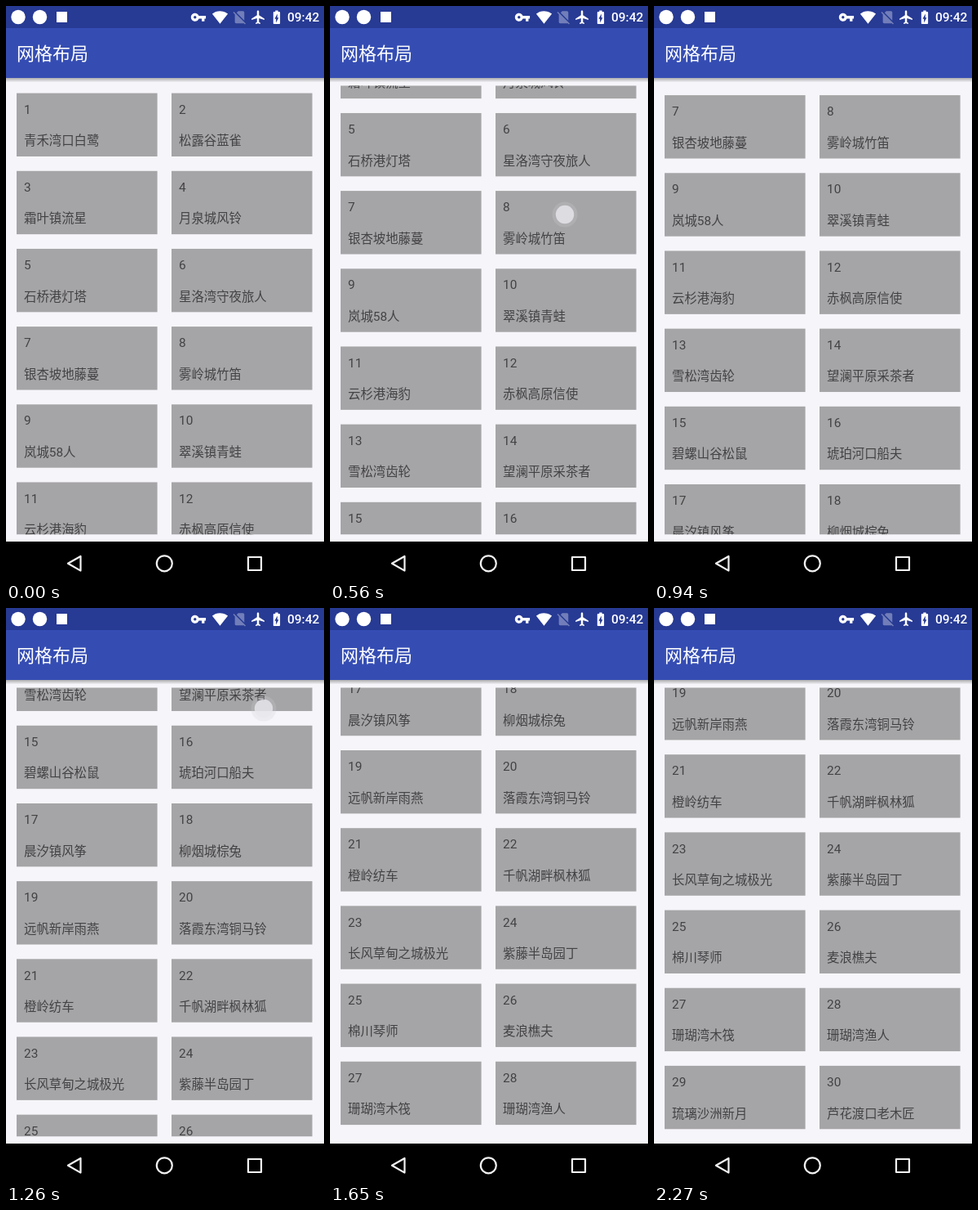
An HTML page for the animation above (2.65 s loop, 390 by 702 pixels).

```html
<!DOCTYPE html>
<html lang="zh-CN">
<head>
<meta charset="utf-8">
<style>
html, body { margin: 0; width: 100%; height: 100%; overflow: hidden; background: #f6f5f9; }
svg { display: block; width: 390px; height: 702px; font-family: Roboto, "Noto Sans CJK SC", "Noto Sans CJK", sans-serif; }
#list { font-size: 15.4px; fill: #434244; }
#list rect { fill: #a5a4a6; }
</style>
</head>
<body>
<svg viewBox="0 0 390 702">
  <defs>
    <clipPath id="view"><rect y="97.5" width="390" height="548.7"/></clipPath>
    <linearGradient id="shadow" x2="0" y2="1">
      <stop stop-color="#000" stop-opacity=".3"/>
      <stop offset="1" stop-color="#000" stop-opacity="0"/>
    </linearGradient>
  </defs>
  <rect width="390" height="702" fill="#f6f5f9"/>
  <g clip-path="url(#view)"><g id="list"></g></g>

  <rect y="88" width="390" height="5.5" fill="url(#shadow)"/>
  <rect width="390" height="88" fill="#354db3"/>
  <rect width="390" height="27" fill="#273a94"/>
  <g id="status" fill="#fff">
    <circle cx="15" cy="13.5" r="8.7"/>
    <circle cx="41.5" cy="13.5" r="8.7"/>
    <rect x="62" y="7" width="13" height="13"/>
    <text x="345" y="19.3" font-size="15.5" font-weight="500">09:42</text>
    <text x="13" y="66" font-size="22">网格布局</text>
  </g>

  <rect y="655" width="390" height="47" fill="#000"/>
  <g fill="none" stroke="#f2f2f2" stroke-width="2.2" stroke-linejoin="round">
    <path d="M76 681.8 L91.5 673 V690.6 Z"/>
    <circle cx="194.3" cy="681.8" r="9.5"/>
    <rect x="297" y="674" width="16" height="16"/>
  </g>

  <g id="touch">
    <circle r="15.5" fill="#d0ced8" opacity=".25"/>
    <circle r="11.2" fill="#e8e7ec" opacity=".8"/>
  </g>
</svg>
<script>
const $ = id => document.getElementById(id);

const names = `青禾湾口白鹭 松露谷蓝雀 霜叶镇流星 月泉城风铃 石桥港灯塔 星洛湾守夜旅人
银杏坡地藤蔓 雾岭城竹笛 岚城58人 翠溪镇青蛙 云杉港海豹 赤枫高原信使
雪松湾齿轮 望澜平原采茶者 碧螺山谷松鼠 琥珀河口船夫 晨汐镇风筝 柳烟城棕兔
远帆新岸雨燕 落霞东湾铜马铃 橙岭纺车 千帆湖畔枫林狐 长风草甸之城极光 紫藤半岛园丁
棉川琴师 麦浪樵夫 珊瑚湾木筏 珊瑚湾渔人 琉璃沙洲新月 芦花渡口老木匠`.split(/\s+/);

$('list').innerHTML = names.map((name, i) => {
  const x = i % 2 ? 203 : 13, y = 106.6 + (i >> 1) * 95.17;
  return `<rect x="${x}" y="${y}" width="172.6" height="77.4"/>
    <text x="${x + 9}" y="${y + 25.2}">${i + 1}</text>
    <text x="${x + 9}" y="${y + 63.7}">${name}</text>`;
}).join('');

// Status icons on a 24-unit grid: centre x, opacity, path
const icons = [
  [236, 1, 'M12.65 10C11.83 7.67 9.61 6 7 6c-3.31 0-6 2.69-6 6s2.69 6 6 6c2.61 0 4.83-1.67 5.65-4H17v4h4v-4h2v-4zM7 14c-1.1 0-2-.9-2-2s.9-2 2-2 2 .9 2 2-.9 2-2 2z'],
  [262.5, 1, 'M12 21.5L23.64 7C23.2 6.66 18.7 3 12 3S.8 6.66.36 7z'],
  [286.5, .35, 'M19 5c0-1.1-.9-2-2-2h-7L7.66 5.34 19 16.68zM3.65 3.88L2.38 5.15 5 7.77V19c0 1.1.9 2 2 2h10c.35 0 .67-.1.96-.26l1.88 1.88 1.27-1.27z'],
  [309.5, 1, 'M21 16v-2l-8-5V3.5C13 2.67 12.33 2 11.5 2S10 2.67 10 3.5V9l-8 5v2l8-2.5V19l-2 1.5V22l3.5-1 3.5 1v-1.5L13 19v-5.5z'],
  [332, 1, 'M15.67 4H14V2h-4v2H8.33C7.6 4 7 4.6 7 5.33v15.33C7 21.4 7.6 22 8.33 22h7.33c.74 0 1.34-.6 1.34-1.33V5.33C17 4.6 16.4 4 15.67 4zM11 20v-5.5H9L13 7v5.5h2z']
];
$('status').innerHTML += icons.map(([x, alpha, d]) =>
  `<path d="${d}" opacity="${alpha}" transform="translate(${x - 10} 3.8) scale(.83)"/>`).join('');

const LOOP = 2650, MAX_SCROLL = 879.1;

const ticks = [0, 250, 330, 400, 480, 550, 640, 710, 790, 870, 940,
  1110, 1190, 1260, 1330, 1410, 1490, 1570, 1650,
  1800, 1880, 1960, 2040, 2110, 2190, 2270];

// Finger drags: time down and up, start point, travel, release speed in px/ms, fling distance and duration
const drags = [
  { down: 223, up: 710, x: 249, y: 421, dx: 60, dy: 255, speed: .34, fling: 28, glide: 236 },
  { down: 1050, up: 1260, x: 250, y: 469, dx: 66, dy: 346, speed: .9, fling: 160.7, glide: 430 },
  { down: 1760, up: 2180, x: 255, y: 440, dx: 50, dy: 250, speed: .3, fling: 0, glide: 1 }
];

const progress = (t, from, length) => Math.min(1, Math.max(0, (t - from) / length));

// Starts at rest and leaves the screen at the release speed
function dragged({ down, up, dy, speed }, t) {
  const u = progress(t, down, up - down), slope = speed * (up - down) / dy;
  return u * u * (3 - 2 * u + slope * (u - 1));
}

const flung = ({ up, glide }, t) => 1 - (1 - progress(t, up, glide)) ** 2.36;

function draw(now) {
  const time = now % LOOP;
  const t = ticks.findLast(tick => tick <= time);
  const scroll = drags.reduce((sum, d) => sum + d.dy * dragged(d, t) + d.fling * flung(d, t), 0);
  $('list').setAttribute('transform', `translate(0 ${-Math.min(MAX_SCROLL, scroll)})`);

  const drag = drags.find(d => t >= d.down && t <= d.up);
  $('touch').style.display = drag ? '' : 'none';
  if (drag) {
    const u = dragged(drag, t);
    $('touch').setAttribute('transform', `translate(${drag.x + drag.dx * u} ${drag.y - drag.dy * u})`);
  }
}

const start = performance.now();
function loop() {
  draw(performance.now() - start);
  requestAnimationFrame(loop);
}
loop();
</script>
</body>
</html>
```
